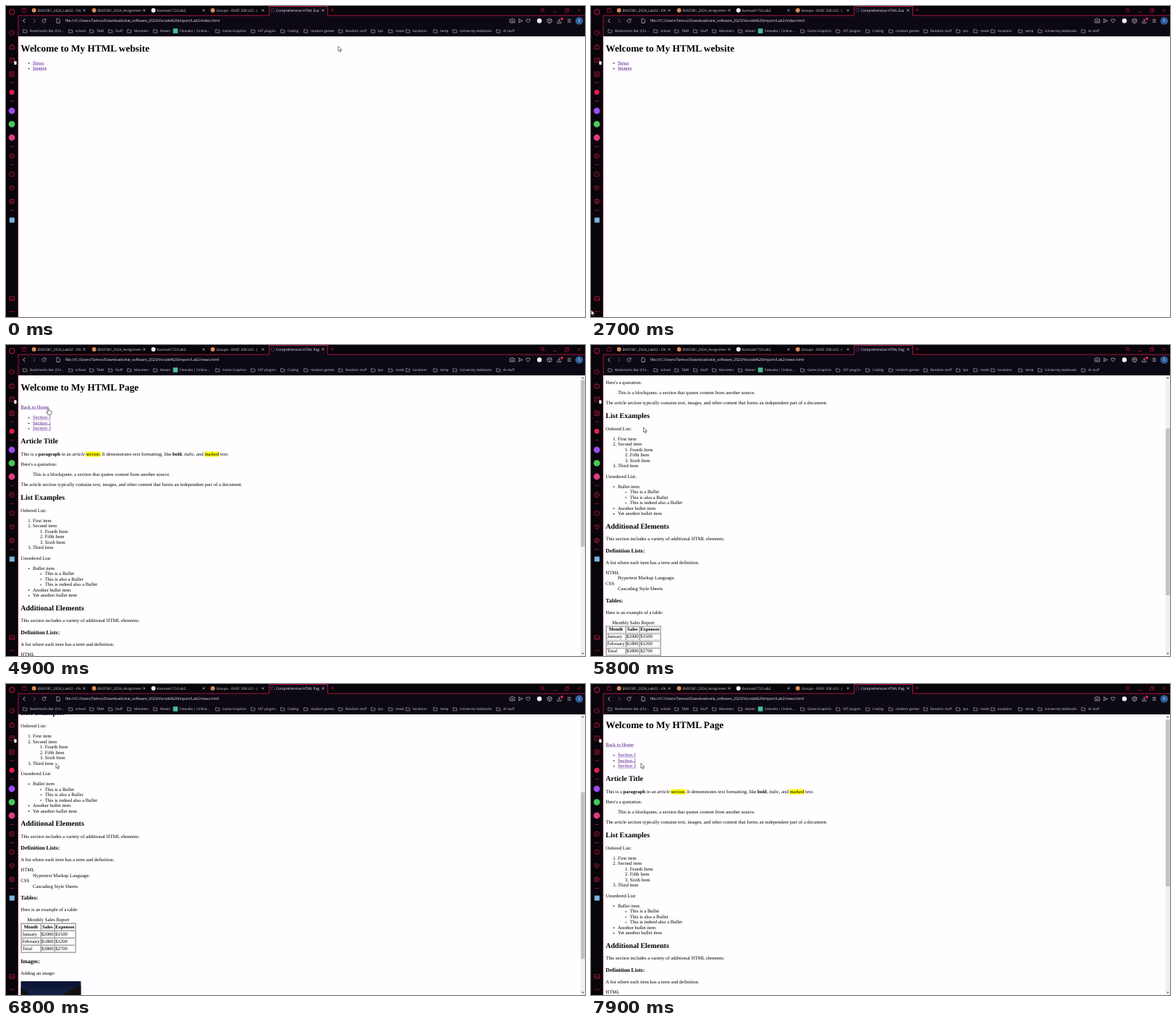
Write an HTML page that moves like this. It is 800x430 px and loops after 8 s.

```html
<!DOCTYPE html>
<html lang="en">
<head>
<meta charset="utf-8">
<title>Browser walkthrough</title>
<style>
html, body { margin: 0; width: 100%; height: 100%; overflow: hidden; background: #07040a; text-rendering: geometricPrecision; }
svg { position: absolute; left: 0; top: 0; font-family: "Open Sans", sans-serif; }
#view { position: absolute; left: 17.3px; top: 42px; width: 782.7px; height: 388px; overflow: hidden; background: #fffdff; }
/* pages are laid out for a 1920 px wide screen */
.page { position: absolute; box-sizing: border-box; width: 1878px; padding: 0 8px; transform-origin: 0 0;
  font: 16px "Liberation Serif", serif; color: #000; }
.page h1 { font-size: 32px; margin: 21.44px 0; }
.page::before { content: ""; display: block; height: 8px; margin-bottom: -8px; }
.page a { color: #551a8b; text-decoration: underline; }
mark { background: #ff0; }
.photo { display: inline-block; }
</style>
</head>
<body>
<svg id="chrome" width="800" height="430"></svg>
<div id="view">
  <div class="page" id="home">
    <h1>Welcome to My HTML website</h1>
    <ul><li><a>News</a></li><li><a>Images</a></li></ul>
  </div>
  <div class="page" id="news">
    <h1>Welcome to My HTML Page</h1>
    <br><a>Back to Home</a>
    <ul><li><a>Section 1</a></li><li><a>Section 2</a></li><li><a>Section 3</a></li></ul>
    <h2>Article Title</h2>
    <p>This is a <b>paragraph</b> in an <i>article</i> <mark>section.</mark> It demonstrates text formatting, like <b>bold</b>, <i>italic</i>, and <mark>marked</mark> text.</p>
    <p>Here's a quotation:</p>
    <blockquote>This is a blockquote, a section that quotes content from another source.</blockquote>
    <p>The article section typically contains text, images, and other content that forms an independent part of a document.</p>
    <h2>List Examples</h2>
    <p>Ordered List:</p>
    <ol><li>First item</li><li>Second item<ol><li>Fourth Item</li><li>Fifth Item</li><li>Sixth Item</li></ol></li><li>Third item</li></ol>
    <p>Unordered List:</p>
    <ul><li>Bullet item<ul><li>This is a Bullet</li><li>This is also a Bullet</li><li>This is indeed also a Bullet</li></ul></li><li>Another bullet item</li><li>Yet another bullet item</li></ul>
    <h2>Additional Elements</h2>
    <p>This section includes a variety of additional HTML elements:</p>
    <h3>Definition Lists:</h3>
    <p>A list where each item has a term and definition.</p>
    <dl><dt>HTML</dt><dd>Hypertext Markup Language.</dd><dt>CSS</dt><dd>Cascading Style Sheets</dd></dl>
    <h3>Tables:</h3>
    <p>Here is an example of a table:</p>
    <table border="1"><caption>Monthly Sales Report</caption>
      <tr><th>Month</th><th>Sales</th><th>Expenses</th></tr>
      <tr><td>January</td><td>$2000</td><td>$1500</td></tr>
      <tr><td>February</td><td>$1800</td><td>$1200</td></tr>
      <tr><td>Total</td><td>$3800</td><td>$2700</td></tr>
    </table>
    <h3>Images:</h3>
    <p>Adding an image:</p>
    <svg class="photo" style="position:static" width="200" height="200">
      <defs>
        <linearGradient id="sky" x2="0" y2="1"><stop stop-color="#0a1230"/><stop offset=".35" stop-color="#1b2a55"/></linearGradient>
        <radialGradient id="glow"><stop stop-color="#ffe2a0"/><stop offset=".3" stop-color="#a8733a"/><stop offset="1" stop-color="#17110f" stop-opacity="0"/></radialGradient>
      </defs>
      <path d="M0 0H200V200H0Z" fill="url(#sky)"/>
      <path d="M0 20L45 55L85 68L130 48L200 12V200H0Z" fill="#14110f"/>
      <ellipse cx="98" cy="90" rx="75" ry="48" fill="url(#glow)"/>
    </svg>
  </div>
</div>
<svg id="overlay" width="800" height="430">
  <g id="scrollbar">
    <path d="M793.8 42H800V430H793.8Z" fill="#f1f1f1"/>
    <path d="M795.2 46.2L797 44.2L798.8 46.2ZM795.2 425.8L797 427.8L798.8 425.8Z" fill="#505050"/>
    <rect id="thumb" x="794.2" y="48.3" width="5.4" height="230.5" fill="#c1c1c1"/>
  </g>
  <g id="cursor" stroke-linejoin="round">
    <path id="arrow" d="M0 0V7L1.6 5.6L2.7 8L3.8 7.5L2.8 5.2H5Z" fill="#fff" stroke="#222" stroke-width=".6"/>
    <path id="hand" d="M-.7 .5Q0-.6 .7 .5V3Q1.6 2.5 2 3.3Q3 2.8 3.3 3.6Q4.4 3.2 4.5 4.3V6.5L3.6 9H-.6L-2.6 5.7Q-2.6 4.5-1.4 5L-.7 5.8Z" fill="#fff" stroke="#111" stroke-width=".6"/>
    <path id="beam" d="M-1.5-3.5H-.4L0-3.1L.4-3.5H1.5M0-3.1V3.1M-1.5 3.5H-.4L0 3.1L.4 3.5H1.5" fill="none" stroke="#222" stroke-width=".6"/>
  </g>
</svg>
<script>
const $ = id => document.getElementById(id);
const RED = '#c01645', PALE = '#d6d1df', SCALE = 800 / 1920, LOOP = 8000;

const text = (x, y, s, size, fill = PALE, id = '') =>
  `<text id="${id}" x="${x}" y="${y}" font-size="${size}" fill="${fill}">${s}</text>`;
const line = (d, color = PALE, w = .65) => `<path d="${d}" fill="none" stroke="${color}" stroke-width="${w}"/>`;
const disc = (x, y, r, fill) => `<circle cx="${x}" cy="${y}" r="${r}" fill="${fill}"/>`;
const ring = (x, y, r, color = RED, w = .8) => `<circle cx="${x}" cy="${y}" r="${r}" fill="none" stroke="${color}" stroke-width="${w}"/>`;
const box = (x, y, w, h, fill) => `<rect x="${x}" y="${y}" width="${w}" height="${h}" fill="${fill}"/>`;
const cube = (x, y, c) => line(`M${x} ${y - 3.3}l3 1.6v3.4l-3 1.6l-3-1.6v-3.4zl3 0M${x - 3} ${y - 1.7}l3 1.6l3-1.6M${x} ${y}v3.3`.replace('zl3 0', 'z'), c);
const cross = (x, y, c, r = 1.6) => line(`M${x - r} ${y - r}l${2 * r} ${2 * r}m0 ${-2 * r}l${-2 * r} ${2 * r}`, c);

function tabs() {
  const list = [[36, 'ENSF381_2024_Lab02 - EN', '#d98a55'], [119, 'ENSF381_2024_Assignmen', '#d98a55'],
    [201, 'Kumoa4172/Lab2', '#f2f0f5'], [283, 'Groups - ENSF 338 L02 - (', '#d98a55']];
  return box(363.5, .5, 81, 13, '#0e0a16') + line('M17 430V13.2H363.5V.5H444.5V13.2H800', RED, .9)
    + list.map(([x, s, c]) => disc(x + 2.7, 6, 3, c) + text(x + 7.4, 7.8, s, 4.9) + cross(x + 72, 6, PALE)).join('')
    + `<rect x="366.2" y="3.8" width="4.4" height="4.4" rx="1" fill="none" stroke="#8a5bd0" stroke-width=".8" stroke-dasharray="1 .7"/>`
    + text(373, 7.8, '', 4.9, '#f4f0fa', 'title') + cross(438, 6, PALE)
    + line('M22.3 4h5.4v4.5h-5.4zM24 4v-1h2v1M448.8 5.5h4.4m-2.2-2.2v4.4M742.3 7.2l2.3 2M756 8.5h5M772.5 5h3.8v3.8h-3.8zM774 5v-1.4h3.8v3.8h-1.4', RED)
    + ring(741, 5.5, 2, RED) + cross(792, 6, RED, 2);
}

function toolbar() {
  return box(17.5, 13.7, 783, 28.3, '#0d0914')
    + line('M26.3 17.8L23.7 20.5L26.3 23.2', '#eee', .8) + line('M37.7 17.8L40.3 20.5L37.7 23.2', '#77717f', .8)
    + line('M54.5 18.8A2.5 2.5 0 1 0 55 21M55.2 17.5v2h-2M70 17.5h2.8l1.5 1.5v4.5h-4.3zM696.2 18.5h1.5l.8-1h2l.8 1h1.5v4.5h-6.6zM708.3 18l5.4 2.5l-5.4 2.5l1-2.5zM721.3 23.2L718.7 20.4Q718.3 18.2 720 18.1Q721 18.3 721.3 19Q722 17.9 723 18.1Q724.6 18.6 723.9 20.4ZM764.3 17.5v4m-1.7-1.6l1.7 1.7l1.7-1.7M761.6 21.5v2h5.4v-2M775.8 18.5h4.8M775.8 20.5h4.8M775.8 22.5h4.8')
    + ring(699.5, 20.7, 1.1, PALE, .6) + disc(737, 20.5, 3.2, '#f4f2f6') + cube(751, 20.5, PALE) + disc(768, 17.8, 1.9, '#e0244f')
    + disc(792, 20.5, 5.3, '#2f5d9c') + text(790.5, 22.4, 'S', 5.2, '#fff')
    + text(82, 22.3, '', 5.15, '#f0edf4', 'url');
}

function bookmarks() {
  const list = [[33, 'Bookmarks Bar (Chr...'], [96, 'school'], [125, 'T&amp;W'], [151, 'Stuff'], [177, 'Monsters'], [213, 'Maren'],
    [240, 'Fotavelo | Online...'], [299, 'Game Graphics'], [348, 'VST plugins'], [389, 'Coding'], [421, 'random games'],
    [469, 'Random stuff'], [514, 'Ipo'], [538, 'mods'], [562, 'locations'], [600, 'temp'], [627, 'University textbooks'], [687, 'AI stuff']];
  return list.map(([x, s]) => text(x, 36.2, s, 4.65)
    + (x === 240 ? box(230.8, 31.2, 6.6, 6.6, '#48bd94') : line(`M${x - 9.3} 32.6h2l.7.8h2.5v3.5h-5.2z`, PALE, .55))).join('');
}

function sidebar() {
  const dashes = [106, 131.5, 194.5, 219.5, 282.5].map(y => `M5.6 ${y}h5.2`).join('');
  return ring(8.2, 8.3, 3.6, RED, 1.1) + ring(8, 37, 3.3) + line('M8 38l1.8-2', RED)
    + line('M4.8 55h6.4v4.5h-6.4zM6 55l2-2.2l2 2.2M5 72h6.5v4.5l-2 1.5h-4.5zM7.3 73.5v2M9.3 73.5v2M4.8 91h6.4v6.4h-6.4z', RED, .8)
    + `<rect x="11.2" y="76.3" width="3.4" height="5" rx="1.2" fill="#eee"/>` + ring(8, 94.2, 1.5)
    + disc(8, 119.3, 3.5, '#e0204a') + disc(8, 145, 4.4, '#a04af0') + disc(8, 163.3, 4.4, '#48c858') + disc(8, 182, 4.4, '#e23a85')
    + ring(8, 207.3, 3.5) + line('M7 205.5v3.6l2.7-1.8z', RED) + ring(8, 232.5, 3.5) + line('M8 230.5v2.2l1.5 1', RED)
    + cube(8, 251.2, RED) + ring(8, 270.2, 3.2, RED, 1) + ring(8, 270.2, 1.2) + box(4.8, 292.5, 7, 7, '#77b5df')
    + line('M4.7 401.8h6.8v5.4h-6.8zM5 406l2-2l1.8 1.8l1-1l1.6 1.5', RED, .8)
    + [5.5, 8.2, 10.9].map(x => disc(x, 422.5, .8, RED)).join('') + line(dashes, '#a0123a', .9);
}

$('chrome').innerHTML = toolbar() + tabs() + bookmarks() + sidebar();

// keys: [time, ...values]
function sample(keys, t, ease = k => k) {
  let i = keys.findIndex(k => k[0] > t);
  if (i < 0) return keys[keys.length - 1].slice(1);
  const a = keys[i - 1], b = keys[i], k = ease((t - a[0]) / (b[0] - a[0]));
  return a.slice(1).map((v, n) => v + (b[n + 1] - v) * k);
}
const smooth = k => k * k * (3 - 2 * k);

const pointer = [[0, 459, 55.5], [1000, 464.5, 55.5], [2000, 464.5, 55.5], [2700, .3, 420.3], [2850, -12, 425], [3100, -12, 250],
  [3800, 42, 79], [4400, 42, 79], [4900, 58.5, 87.5], [5300, 72.5, 113.7], [6200, 72.5, 113.7], [6600, 69, 109.5]];
const scrolling = [[0, 0], [5200, 0], [6200, 188], [6450, 235], [6600, 235], [7200, 43], [7250, 41.7], [7700, 41.7], [7900, 2], [8000, 0]];

const show = (id, on) => $(id).style.display = on ? '' : 'none';

function draw(now) {
  const t = now % LOOP, onNews = t >= 4400;
  const [x, y] = sample(pointer, t, smooth), [scroll] = sample(scrolling, t);
  show('home', !onNews);
  show('news', onNews);
  show('scrollbar', onNews);
  $('title').textContent = 'Comprehensive HTML ' + (onNews ? 'Pag' : 'Exa');
  $('url').textContent = `file:///C:/Users/Tamvo/Downloads/eie_software_2023/Vscode%20import/Lab2/${onNews ? 'news' : 'index'}.html`;
  $('home').style.transform = `scale(${SCALE})`;
  $('news').style.transform = `translateY(${-scroll}px) scale(${SCALE})`;
  $('thumb').setAttribute('y', 48.3 + scroll * .594);
  const shape = t >= 3700 && t < 5000 ? 'hand' : t >= 6100 && t < 6350 ? 'beam' : 'arrow';
  for (const id of ['arrow', 'hand', 'beam']) show(id, id === shape);
  $('cursor').setAttribute('transform', `translate(${x} ${y})`);
  requestAnimationFrame(draw);
}
requestAnimationFrame(draw);
</script>
</body>
</html>
```
